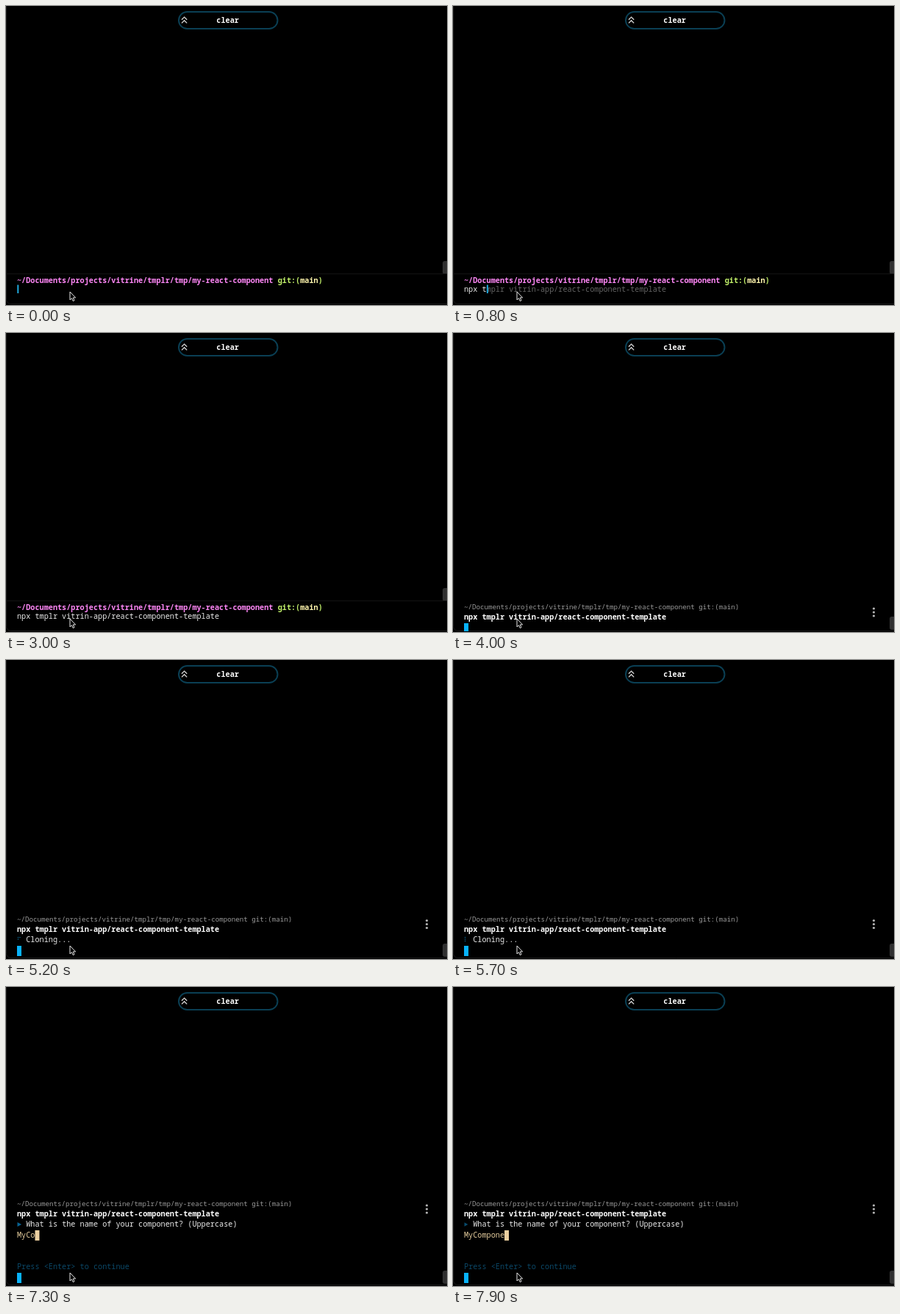
Recreate the animation shown at these times as an HTML page with a canvas. Size 600 by 408 pixels, loop 8 s.

```html
<!DOCTYPE html>
<html lang="en">
<head>
<meta charset="utf-8">
<title>Terminal session</title>
<style>
html, body { margin: 0; width: 100%; height: 100%; overflow: hidden; background: #000; }
canvas { display: block; width: 600px; height: 408px; }
</style>
</head>
<body>
<canvas id="stage" width="600" height="408"></canvas>
<script>
const ctx = document.getElementById('stage').getContext('2d');
const LOOP = 8000, LEFT = 15, CELL = 6.115;
const SIZE = CELL / 0.6, SMALL = 9.18;
const PATH = '~/Documents/projects/vitrine/tmplr/tmp/my-react-component';
const COMMAND = 'npx tmplr vitrin-app/react-component-template';
const ANSWER = 'MyCompone';
const COMMAND_KEYS = [100, 300, 400, 600, 800, 1000, 1100, 1300, 1400, 1600];
const ANSWER_KEYS = [6500, 7000, 7100, 7300, 7400, 7600, 7700, 7900, 7900];
const ACCEPT = 2500, CURSOR_OFF = 2800, ENTER = 3500, CLONE = 5200, ASK = 5900;
const PLAIN = '#eaeaea', BLUE = '#08b2fa';

const col = n => LEFT + n * CELL;
const pressed = (keys, t) => keys.filter(k => k <= t).length;

function text(str, x, y, color, weight = 500, size = SIZE) {
  ctx.font = `${weight} ${size}px "Noto Sans Mono", "DejaVu Sans Mono", monospace`;
  ctx.fillStyle = color;
  ctx.fillText(str, x, y);
}

function rect(x, y, w, h, color) {
  ctx.fillStyle = color;
  ctx.fillRect(x, y, w, h);
}

function pill(x, y, w, h, r) {
  ctx.beginPath();
  ctx.roundRect(x, y, w, h, r);
}

function dot(x, y, r, color) {
  ctx.fillStyle = color;
  ctx.beginPath();
  ctx.arc(x, y, r, 0, Math.PI * 2);
  ctx.fill();
}

function poly(points, closed) {
  ctx.beginPath();
  points.forEach(([x, y]) => ctx.lineTo(x, y));
  if (closed) ctx.closePath();
}

function drawWindow(scrollY) {
  rect(0, 0, 600, 408, '#000');
  ctx.lineWidth = 1;
  ctx.strokeStyle = '#1a1a1a';
  pill(0.5, -10, 620, 416.5, 6);
  ctx.stroke();
  ctx.fillStyle = '#303030';
  pill(594, scrollY, 10, 18, 3);
  ctx.fill();
}

function drawHeader() {
  ctx.lineWidth = 2;
  ctx.strokeStyle = '#0a3f54';
  pill(235, 8, 134.5, 23, 11.5);
  ctx.stroke();
  ctx.lineWidth = 1.3;
  ctx.strokeStyle = '#d8d8d8';
  for (const y of [18.8, 23.4]) {
    poly([[239, y], [242.6, y - 3.7], [246.2, y]]);
    ctx.stroke();
  }
  text('clear', 286.3, 23, '#fff', 700);
}

function drawPointer() {
  poly([[87, 390], [87, 401], [89.5, 398.8], [91.2, 402.6],
        [93, 401.8], [91.3, 398], [94.6, 398]], true);
  ctx.fillStyle = '#000';
  ctx.fill();
  ctx.lineWidth = 1;
  ctx.strokeStyle = '#e8e8e8';
  ctx.stroke();
}

function drawPrompt(t) {
  rect(0, 365, 600, 1, '#131313');
  text(PATH, LEFT, 377.5, '#ff87f7', 700);
  text('git:(', col(58), 377.5, '#c4f36b', 700);
  text('main', col(63), 377.5, '#fff6ad', 700);
  text(')', col(67), 377.5, '#c4f36b', 700);

  const count = t >= ACCEPT ? COMMAND.length : pressed(COMMAND_KEYS, t);
  text(COMMAND.slice(0, count), LEFT, 389.5, PLAIN);
  if (count) text(COMMAND.slice(count), col(count), 389.5, '#646464');
  if (t < CURSOR_OFF) rect(col(count) + 0.3, 380.5, 2, 11.5, '#1fa8dc');
}

function drawBlock(y) {
  text(PATH + ' git:(main)', LEFT, y, '#999', 500, SMALL);
  text(COMMAND, LEFT, y + 14, '#fff', 700);
  for (const dy of [-1, 4, 9]) dot(572.5, y + dy, 1.6, '#b4b4b4');
}

// Braille spinner: three lit dots circling a 2 by 3 grid.
function drawSpinner(step) {
  const ring = [[0, 0], [1, 0], [1, 1], [1, 2], [0, 2], [0, 1]];
  for (let i = 0; i < 3; i++) {
    const [x, y] = ring[(step + i + 5) % 6];
    dot(16.5 + x * 2.4, 378.5 + y * 2.5, 0.8, '#0b6590');
  }
}

function drawQuestion(t) {
  const pulse = (1 + Math.cos((t - 6600) / 867 * Math.PI * 2)) / 2;
  const size = 2.7 + pulse * 0.6;
  poly([[15.5, 324 - size], [15.5 + size * 1.8, 324], [15.5, 324 + size]], true);
  ctx.fillStyle = `rgb(8, ${75 + pulse * 35}, ${110 + pulse * 55})`;
  ctx.fill();
  text('What is the name of your component? (Uppercase)', col(2), 327.3, PLAIN);

  const count = pressed(ANSWER_KEYS, t);
  text(ANSWER.slice(0, count), LEFT, 341.7, t < 7000 ? '#b9b3a5' : '#e5cd9d');
  rect(col(count), 332, 6, 14, t < 7000 ? '#f3c9b2' : '#ecd0a0');
  text('Press <Enter> to continue', LEFT, 384.7, '#0b4868');
}

function draw(t) {
  const running = t >= ENTER;
  drawWindow(running ? 387 : 348);
  drawHeader();
  if (!running) {
    drawPrompt(t);
  } else if (t < CLONE) {
    drawBlock(377);
    rect(LEFT, 396, 6, 11, BLUE);
  } else {
    drawBlock(t < ASK ? 356.5 : 299);
    if (t < ASK) {
      drawSpinner((t - CLONE) / 100);
      text('Cloning...', col(2), 384.7, PLAIN);
    } else {
      drawQuestion(t);
    }
    rect(LEFT, 390, 6, 14, BLUE);
  }
  drawPointer();
}

function frame() {
  draw(Math.floor(performance.now() % LOOP / 100) * 100);
  requestAnimationFrame(frame);
}
frame();
</script>
</body>
</html>
```
